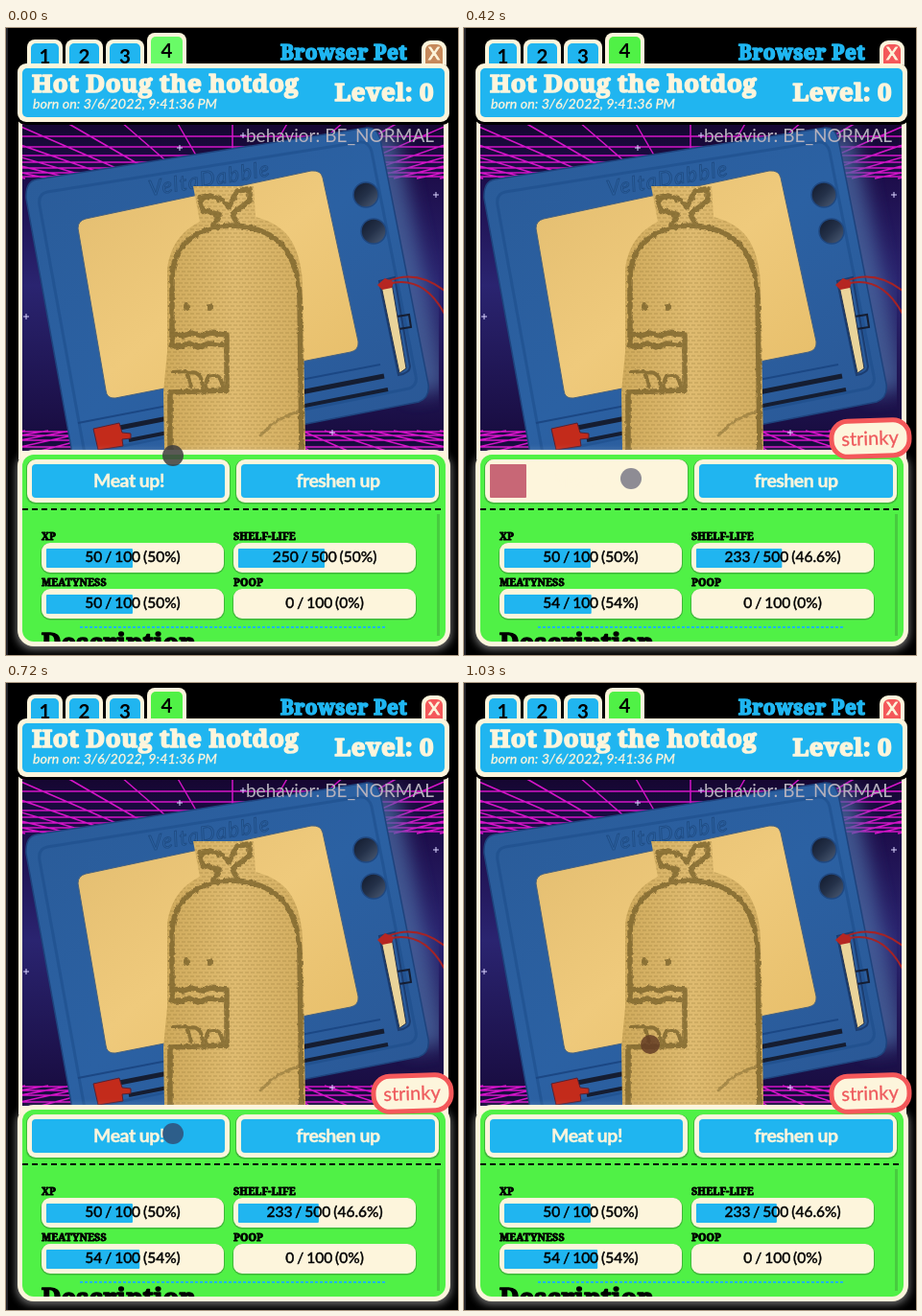
An HTML page for the animation above (1.09 s loop, 471 by 654 pixels).

```html
<!DOCTYPE html>
<html lang="en">
<head>
<meta charset="utf-8">
<title>Browser Pet</title>
<style>
html, body { margin: 0; width: 100%; height: 100%; overflow: hidden; background: #000; }
svg { display: block; width: 471px; height: 654px; }
text { font-family: Lato, "Open Sans", sans-serif; }
.slab { font-family: "Noto Serif", "DejaVu Serif", serif; font-weight: 900; stroke-width: 1.7; stroke-linejoin: round; letter-spacing: .45px; }
.cream { fill: #fdf5dc; stroke: #fdf5dc; }
.ink { fill: #000; stroke: #000; }
.label { font-size: 10.7px; stroke-width: .9; letter-spacing: .1px; }
.mid { text-anchor: middle; }
.btn { font-size: 19.5px; font-weight: 700; letter-spacing: -.5px; fill: #fdf5dc; stroke: #fdf5dc; stroke-width: .4; text-anchor: middle; }
.value { font-size: 15.5px; text-anchor: middle; stroke: #000; stroke-width: .45; word-spacing: -1px; }
.tab { font-size: 20.5px; font-weight: 700; text-anchor: middle; }
.marker { fill: none; stroke: #725b28; stroke-width: 5.5; stroke-linejoin: round; stroke-linecap: round; opacity: .72; }
.faint { stroke-width: 5; opacity: .62; }
</style>
</head>
<body>
<svg id="stage" viewBox="0 0 471 654">
  <defs>
    <linearGradient id="sky" x2="0" y2="1">
      <stop offset="0" stop-color="#15062f"/><stop offset=".17" stop-color="#1d0d4a"/><stop offset=".5" stop-color="#2a2470"/><stop offset="1" stop-color="#170a3c"/>
    </linearGradient>
    <linearGradient id="plastic" x2="1" y2="1">
      <stop offset="0" stop-color="#2a5b98"/><stop offset=".5" stop-color="#2b61a3"/><stop offset="1" stop-color="#2a5693"/>
    </linearGradient>
    <linearGradient id="screen" x2="1" y2="1">
      <stop offset="0" stop-color="#e3bd70"/><stop offset=".5" stop-color="#efca7c"/><stop offset="1" stop-color="#e6bd68"/>
    </linearGradient>
    <linearGradient id="skin">
      <stop offset="0" stop-color="#cfaa5c"/><stop offset=".5" stop-color="#dfbb70"/><stop offset="1" stop-color="#d2ad60"/>
    </linearGradient>
    <linearGradient id="hole" x2="1" y2="1"><stop offset="0" stop-color="#10182a"/><stop offset=".5" stop-color="#243149"/><stop offset="1" stop-color="#4f5f78"/></linearGradient>
    <pattern id="mesh" width="6" height="8" patternUnits="userSpaceOnUse">
      <path d="M0 2h4M3 6h4M0 6h1" stroke="#83672a" stroke-width="1.4" opacity=".25"/>
    </pattern>
    <filter id="rough" x="-10%" y="-10%" width="120%" height="120%">
      <feTurbulence type="fractalNoise" baseFrequency=".22" numOctaves="2" seed="4"/>
      <feDisplacementMap in="SourceGraphic" scale="4" xChannelSelector="R" yChannelSelector="G"/>
      <feGaussianBlur stdDeviation=".7"/>
    </filter>
    <filter id="soft" x="-20%" y="-20%" width="140%" height="140%"><feGaussianBlur stdDeviation="4"/></filter>
    <filter id="haze" x="-20%" y="-20%" width="140%" height="140%"><feGaussianBlur stdDeviation="10"/></filter>
    <clipPath id="view"><rect x="17" y="96" width="439" height="345"/></clipPath>
    <clipPath id="panelClip"><rect x="17" y="445" width="441" height="195" rx="12"/></clipPath>
    <path id="board" d="M32 158L376 104Q386 103 390 116L440 371Q442 386 430 390L72 460L21 178Q20 160 32 158Z"/>
    <path id="openBody" d="M195 165H258L260 197C290 205 306 222 309 265L312 441H165L164 380L168 338V252C171 226 184 211 202 202Z"/>
    <path id="closedBody" d="M204 190L256 187L257 214C287 222 305 240 306 270L309 345L317 441H156Q165 405 166 345L170 270C171 245 188 226 208 221Z"/>
  </defs>

  <rect width="471" height="654"/>
  <rect width="2" height="654" fill="#25252c"/>

  <!-- scene -->
  <rect x="13" y="90" width="448" height="360" fill="#fdf5dc"/>
  <g clip-path="url(#view)">
    <rect x="17" y="96" width="439" height="345" fill="url(#sky)"/>
    <g id="grid" fill="none" stroke="#d414c8" stroke-width="1.5"></g>
    <path d="M386 112L440 380" stroke="#4a679f" stroke-width="40" filter="url(#haze)" opacity=".8"/>
    <g id="stars" fill="none" stroke="#d9d3ff"></g>
    <use href="#board" fill="url(#plastic)" stroke="#1e437d" stroke-width="1.5"/>
    <path d="M43 171L369 119Q378 118 381 129L427 363Q429 373 420 376L82 444L35 185Q33 173 43 171Z" fill="none" stroke="#1b4a88" stroke-width="3" opacity=".5"/>
    <path d="M83 199L318 149Q328 148 330 156L367 327Q368 336 359 338L114 386Q105 387 104 378L75 209Q75 201 83 199Z" fill="url(#screen)" stroke="#46617f" stroke-width="1"/>
    <text x="150" y="175" transform="rotate(-9.5 150 175)" font-size="22" font-style="italic" letter-spacing="1.5" fill="#2b609f" stroke="#1f4b82" stroke-width=".8">VeltaDabble</text>
    <g fill="url(#hole)" stroke="#204880" stroke-width="1.5">
      <circle cx="375" cy="174" r="13"/><circle cx="383" cy="212" r="13"/>
    </g>
    <g fill="none" stroke="#151d31">
      <path d="M118 417L394 363" stroke-width="5"/>
      <path d="M128 430L398 377" stroke-width="4"/>
      <path d="M75 412L390 351" stroke="#1b4784" stroke-width="2"/>
      <path d="M389 264L405 260L421 353Q421 360 409 362Z" stroke="#1b3d71" stroke-width="2"/>
      <path d="M407 301l13-2 2 13-13 2z" stroke-width="2"/>
    </g>
    <path d="M398 264C419 255 439 260 457 274M398 267C427 259 446 277 458 300" fill="none" stroke="#a52325" stroke-width="2"/>
    <path d="M391 269L402 266L417 355L410 360Z" fill="#ead49a" stroke="#25334d"/>
    <path d="M387 268l8-7 9 4-2 6-10 2z" fill="#b52622"/>
    <path d="M91 418L118 412L121 422L130 423L130 428L121 429L122 436L96 440Z" fill="#c32b1b" stroke="#5b2030"/>

    <g id="open">
      <use href="#openBody" fill="url(#skin)"/>
      <use href="#openBody" fill="url(#mesh)"/>
      <g class="marker" filter="url(#rough)">
        <path d="M173 331V260C174 226 200 207 235 206C280 207 304 232 306 280L308 445"/>
        <path d="M216 205L223 195L205 190L202 178L213 175L226 180L232 187L241 170L254 168L254 180L236 194L241 205"/>
        <path d="M174 319l11 2 8-3 12 3 8-3 17 2v58l-59 2v65M174 332h9l8-3 9 4 11-4 18 2"/>
        <path d="M174 359l14-1 5 16M190 360q14-4 15 15M209 376q-2-15 8-14q8 1 9 14" stroke-width="4"/>
        <path d="M266 424q15-17 41-25" stroke-width="3" opacity=".6"/>
        <path d="M188 290v2M212 290v2" stroke-width="6"/>
      </g>
    </g>
    <g id="closed">
      <use href="#closedBody" fill="url(#skin)"/>
      <use href="#closedBody" fill="url(#mesh)"/>
      <g class="marker faint" filter="url(#rough)">
        <path d="M173 438V375L174 270C176 238 199 222 235 220C278 220 303 239 304 272L306 345"/>
        <path d="M222 217L222 208L207 204L206 193L219 195L231 191L244 195L255 192L253 205L240 209L241 218"/>
        <path d="M174 325l16 1 10-2 13 2 14-2 4 8 2 40-59 2"/>
        <path d="M175 332q6 12 13 0q7 12 13 0q7 12 14 0q6 10 13 0M175 352h13q8 0 7 15M201 354q15-5 22 7l-4 10h-17z" stroke-width="4"/>
        <path d="M192 298v1M213 298v1" stroke-width="7"/>
      </g>
    </g>
    <text x="446" y="119" text-anchor="end" font-size="19" fill="#b5b1bd">behavior: BE_NORMAL</text>
  </g>

  <!-- header -->
  <g id="tabs"></g>
  <text class="slab" x="286" y="33" font-size="20.8" fill="#1fb6f2" stroke="#1fb6f2">Browser Pet</text>
  <rect x="433" y="13" width="26" height="36" rx="9" fill="#fdf5dc"/>
  <rect id="close" x="437" y="17" width="18" height="28" rx="6"/>
  <text class="cream mid" x="446" y="33" font-size="18" stroke-width=".9">X</text>
  <rect x="10" y="38" width="455" height="63" rx="11"/>
  <rect x="12" y="37" width="450" height="61" rx="9" fill="#fdf5dc"/>
  <rect x="17" y="42" width="440" height="51" rx="5" fill="#20b5f0"/>
  <text class="slab cream" x="27" y="67" font-size="26">Hot Doug the hotdog</text>
  <text class="cream" x="28" y="84" font-size="14.3" font-style="italic" stroke-width=".3">born on: 3/6/2022, 9:41:36 PM</text>
  <text class="slab cream" x="446" y="76" font-size="25.8" text-anchor="end">Level: 0</text>

  <!-- panel -->
  <rect x="11" y="443" width="453" height="205" rx="17" fill="#fff" opacity=".45" filter="url(#soft)"/>
  <rect x="12" y="440" width="451" height="205" rx="17" fill="#fdf5dc"/>
  <rect x="17" y="445" width="441" height="195" rx="12" fill="#50f146"/>
  <g id="buttons"></g>
  <rect id="charge" x="27" y="455" height="35"/>
  <text class="btn" x="128" y="479">Meat up!</text>
  <text class="btn" x="346" y="479">freshen up</text>
  <path d="M17 502H456" stroke="#000" stroke-width="2" stroke-dasharray="6 4"/>
  <path d="M450.500 507V634" stroke="#47cb3f" stroke-width="3"/>
  <g id="bars"></g>
  <path d="M77 625H397" stroke="#20b5f0" stroke-width="2" stroke-dasharray="3 2"/>
  <g clip-path="url(#panelClip)"><text class="slab ink" x="37" y="651" font-size="26.500">Description</text></g>

  <g id="badge" transform="rotate(-2 423 428)">
    <rect x="383" y="409.500" width="81" height="37" rx="17" fill="#fdf5dc" stroke="#f4585a" stroke-width="5"/>
    <text class="mid" x="423" y="435" font-size="20" fill="#ee5a5d" stroke="#ee5a5d" stroke-width=".3">strinky</text>
  </g>
  <circle id="pointer"/>
</svg>
<script>
const LOOP = 1090;
const STEPS = [0, 60, 120, 300, 360, 420, 480, 540, 600, 660, 720, 840, 900, 960, 1030];
const POINTER_PATH = [[0, 174, 446], [60, 174, 460], [120, 174, 470], [720, 174, 470],
  [840, 174, 463], [900, 176, 447], [960, 184, 414], [1030, 194, 377]];
const RED = [240, 85, 90], BLUE = [31, 181, 240];

const $ = id => document.getElementById(id);
const set = (el, attrs) => { for (const k in attrs) el.setAttribute(k, attrs[k]); };
const show = (el, on) => set(el, { visibility: on ? 'visible' : 'hidden' });
const clamp = x => Math.max(0, Math.min(1, x));
const lerp = (a, b, u) => a + (b - a) * u;
const smooth = u => u * u * (3 - 2 * u);
const box = (x, y, w, h, r, fill, id = '') =>
  `<rect ${id && `id="${id}"`} x="${x}" y="${y}" width="${w}" height="${h}" rx="${r}" fill="${fill}"/>`;

function buildGrid() {
  let d = '';
  for (const y of [100, 113, 124, 133, 140, 146, 151, 155, 421, 425, 430, 437]) d += `M17 ${y}H456`;
  for (let i = -11; i <= 11; i++) {
    d += `M${236 + i * 24} 157L${236 + i * 58} 98M${236 + i * 24} 420L${236 + i * 40} 441`;
  }
  $('grid').innerHTML = `<path d="${d}"/>`;
  $('stars').innerHTML = [[181, 125], [21, 301], [340, 422], [448, 174], [247, 112]]
    .map(([x, y]) => `<path d="M${x - 3} ${y}h6M${x} ${y - 3}v6"/>`).join('');
}

function buildControls() {
  $('tabs').innerHTML = [[22, 37], [62, 39], [104, 40], [147, 41]].map(([x, w], i) => {
    const active = i === 3, y = active ? 5 : 12;
    return box(x, y, w, 40, 8, '#fdf5dc') + box(x + 4, y + 4, w - 8, 40, 5, '#20b5f0', `tab${i + 1}`) +
      `<text class="tab" x="${x + w / 2}" y="${active ? 31 : 36.5}">${i + 1}</text>`;
  }).join('');

  $('buttons').innerHTML = [22, 240].map((x, i) =>
    box(x - 1, 450, 213, 46.5, 9, '#3fb83a') + box(x, 450, 211, 45, 9, '#fdf5dc') +
    (i ? box(x + 5, 455, 202, 35, 4, '#20b5f0') : '')).join('');

  const bars = [['XP', 37, 537, 'xp'], ['SHELF-LIFE', 237, 537, 'shelf'],
    ['MEATYNESS', 37, 585, 'meat'], ['POOP', 237, 585, 'poop']];
  $('bars').innerHTML = bars.map(([label, x, y, id]) =>
    `<text class="slab ink label" x="${x}" y="${y - 3}">${label}</text>` +
    box(x - 1, y, 192, 32.5, 10, '#3fb83a') + box(x, y, 190, 31, 9, '#fdf5dc') +
    box(x + 5, y + 6, 0, 20, 1, '#20b5f0', id) +
    `<text class="value" id="${id}Text" x="${x + 95}" y="${y + 20}"></text>`).join('');
}

function setBar(id, width, text) {
  set($(id), { width });
  $(id + 'Text').textContent = text;
}

function pointerAt(t) {
  const next = POINTER_PATH.findIndex(p => p[0] >= t);
  const b = POINTER_PATH[next], a = POINTER_PATH[Math.max(0, next - 1)];
  const u = b[0] === a[0] ? 0 : (t - a[0]) / (b[0] - a[0]);
  return { cx: lerp(a[1], b[1], u), cy: lerp(a[2], b[2], u) };
}

function draw(time) {
  const t = STEPS.filter(s => s <= time).pop();
  const fed = t >= 360, pressed = t === 300;
  const closed = (t >= 300 && t < 420) || (t >= 840 && t < 960);
  show($('closed'), closed);
  show($('open'), !closed);
  show($('badge'), fed);
  set($('close'), { fill: fed ? '#f4585a' : '#c6895b' });
  set($('tab4'), { fill: t < 420 ? '#69fb67' : '#50f146' });

  const charge = fed ? clamp((t - 365) / 291) : 1;
  const color = RED.map((c, i) => Math.round(lerp(c, BLUE[i], charge)));
  set($('charge'), { width: 201 * charge, fill: `rgb(${color})`, rx: charge === 1 ? 4 : 1 });

  const u = smooth(clamp((t - 360) / 300));
  setBar('xp', 90, '50 / 100 (50%)');
  setBar('shelf', lerp(90, 83.9, u), fed ? '233 / 500 (46.6%)' : '250 / 500 (50%)');
  setBar('meat', lerp(90, 97.2, u), fed ? '54 / 100 (54%)' : '50 / 100 (50%)');
  setBar('poop', 0, '0 / 100 (0%)');

  const fill = pressed ? '#7aab5c' : t >= 960 ? '#633c25' : t === 0 ? '#3d3d3d' : '#33355a';
  const opacity = pressed ? .95 : t >= 960 || t === 0 ? .85 : t >= 420 && t < 600 ? .55 : .68;
  set($('pointer'), { ...pointerAt(t), r: t >= 840 ? 10 : 11, fill, opacity });
}

buildGrid();
buildControls();
const start = performance.now();
function tick() {
  draw((performance.now() - start) % LOOP);
  requestAnimationFrame(tick);
}
tick();
</script>
</body>
</html>
```
